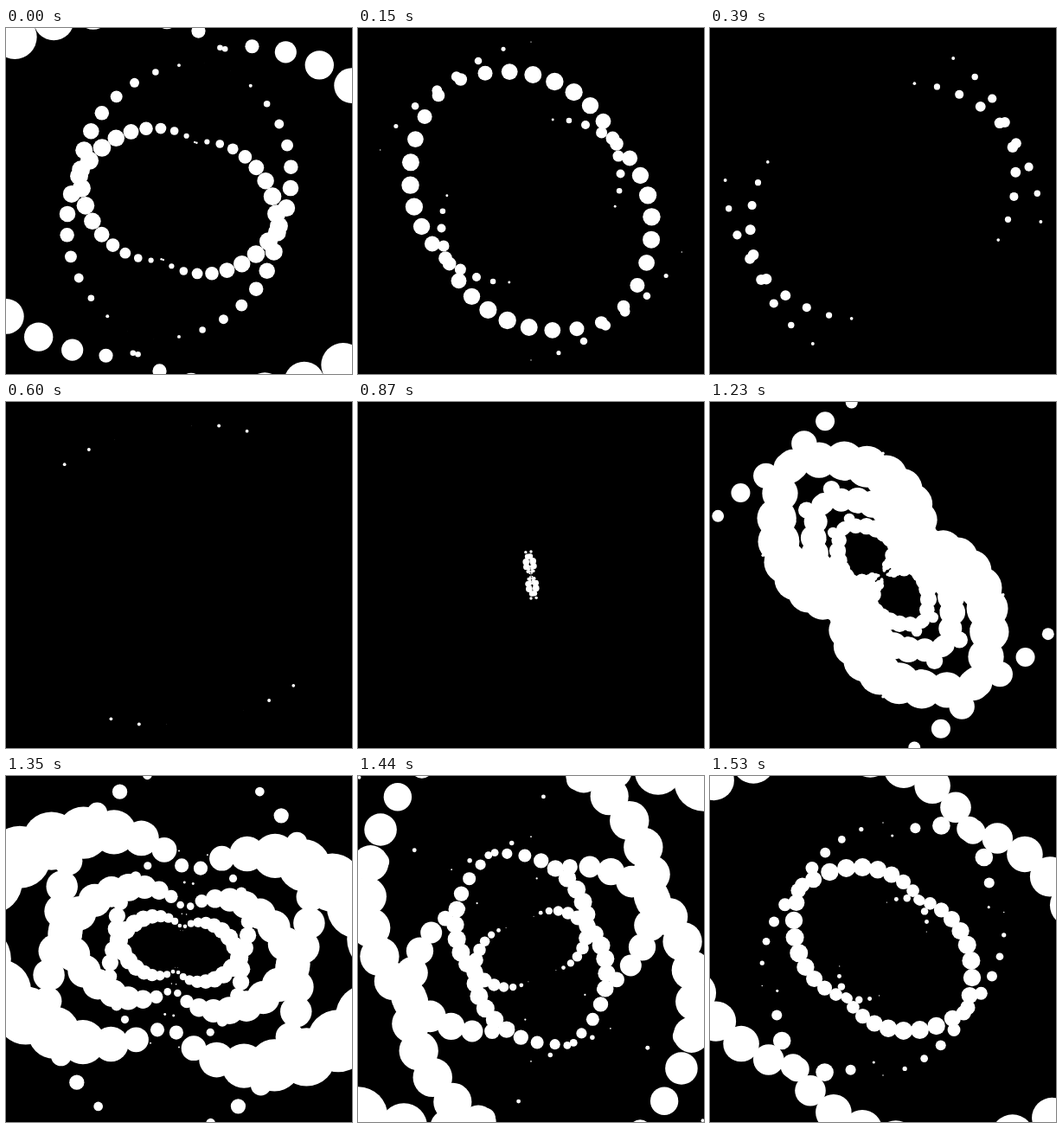
Write an HTML page with a canvas that moves like this. It is 400x400 px and loops after 1560 ms.

```html
<!DOCTYPE html>
<html lang="en">
<head>
<meta charset="utf-8">
<title>Spiral dots</title>
<style>
  html, body { margin: 0; width: 100%; height: 100%; overflow: hidden; background: #000; }
  canvas { display: block; width: 100vw; height: 100vh; }
</style>
</head>
<body>
<canvas id="stage" width="400" height="400"></canvas>
<script>
const ctx = document.getElementById('stage').getContext('2d');
const TICK = 30, TICKS = 52, RESTART = 24;
const DOTS = 35, GAP = 5.41, TWIST = 0.18;
const SPAN = 17.75, MAX_R = 10.55, LAYERS = 3;

// Dot radius: a sine hump between a moving tail and a head that stops at the rim.
function humpAt(phase) {
  const soft = 0.9;
  const head = DOTS - soft * Math.log(1 + Math.exp((DOTS - phase) / soft));
  const tail = Math.max(0, phase - SPAN);
  const width = head - tail;
  if (width <= 0) return () => 0;
  const peak = MAX_R * Math.pow(width / SPAN, 0.9);
  return k => k > tail && k < head ? peak * Math.sin(Math.PI * (k - tail) / width) : 0;
}

function dot(angle, dist, r) {
  const x = 200 + dist * Math.cos(angle), y = 200 + dist * Math.sin(angle);
  ctx.beginPath();
  ctx.arc(x, y, r, 0, Math.PI * 2);
  ctx.fill();
}

function draw(tick) {
  const late = tick >= RESTART;
  const t = late ? tick - RESTART : tick + 29;
  const radius = humpAt(0.98 * t + (late ? 0.95 : 1.65));
  const turn = -Math.PI / 2 - t * TWIST;

  ctx.fillStyle = '#000';
  ctx.fillRect(0, 0, 400, 400);
  ctx.fillStyle = '#fff';

  // Each layer repeats the four arms at a scale that grows with time.
  for (let layer = 0; layer < LAYERS; layer++) {
    const scale = Math.pow(0.09 * t, layer);
    for (let k = 0; k < DOTS; k++) {
      const r = radius(k) * scale;
      if (r < 0.1) continue;
      for (let arm = 0; arm < 4; arm++) {
        const dir = arm % 2 ? -1 : 1;
        dot(turn + arm * Math.PI / 2 + dir * k * TWIST, k * GAP * scale, r);
      }
    }
  }
}

function play(now) {
  draw(Math.floor(Math.max(0, now) / TICK) % TICKS);
  requestAnimationFrame(play);
}
play(performance.now());
</script>
</body>
</html>
```
